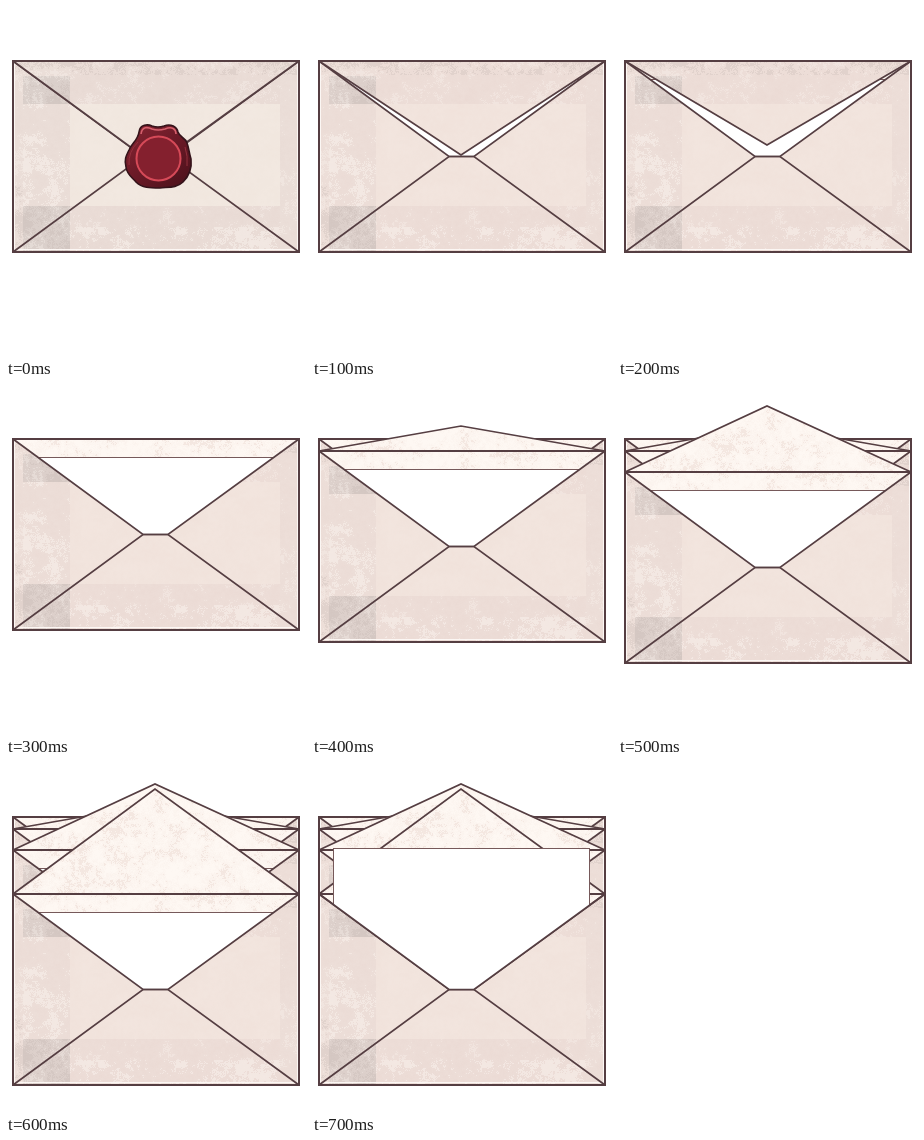
These frames come from a looping animation (300 by 350 pixels, 0.8 s). An HTML page with a canvas:

```html
<!DOCTYPE html>
<html lang="en">
<head>
<meta charset="utf-8">
<title>Opening envelope</title>
<style>
  html, body { margin: 0; width: 100%; height: 100%; overflow: hidden; background: #fff; }
  canvas { display: block; width: 300px; height: 350px; }
</style>
</head>
<body>
<canvas id="stage" width="300" height="350"></canvas>
<script>
const W = 300, H = 350, L = 7, R = 293, TOP = 55, TALL = 191;
const STEP = 100;
const INK = '#553e42';

// Each pose: envelope drop, height of the flap tip, and what else is shown.
const poses = [
  { drop: 0, tip: 159, seal: true },
  { drop: 0, tip: 149 },
  { drop: 0, tip: 139 },
  { drop: 0, tip: 55 },
  { drop: 12, tip: 42 },
  { drop: 33, tip: 22 },
  { drop: 77, tip: 27 },
  { drop: 77, letter: 86 }
];

function makeCanvas(w, h) {
  const c = document.createElement('canvas');
  c.width = w;
  c.height = h;
  return c;
}

function hash(x, y) {
  let n = Math.imul(x, 374761393) + Math.imul(y, 668265263) | 0;
  n = Math.imul(n ^ (n >>> 13), 1274126177);
  return ((n ^ (n >>> 16)) >>> 0) / 4294967296;
}

function noise(x, y) {
  const i = Math.floor(x), j = Math.floor(y);
  const ease = t => t * t * (3 - 2 * t);
  const u = ease(x - i), v = ease(y - j);
  const a = hash(i, j), b = hash(i + 1, j), c = hash(i, j + 1), d = hash(i + 1, j + 1);
  return a + (b - a) * u + (c - a) * v + (a - b - c + d) * u * v;
}

const grain = (x, y) =>
  noise(x / 16, y / 13) * .4 + noise(x / 3.5 + 40, y / 3.5) * .35 + hash(x, y + 500) * .25;

const mix = (a, b, k) => a.map((v, i) => v + (b[i] - v) * k);

function texture(w, h, shade) {
  const c = makeCanvas(w, h), g = c.getContext('2d');
  const img = g.createImageData(w, h);
  for (let y = 0; y < h; y++) {
    for (let x = 0; x < w; x++) {
      const p = shade(x, y), k = (y * w + x) * 4;
      img.data.set([p[0], p[1], p[2], 255], k);
    }
  }
  g.putImageData(img, 0, 0);
  return c;
}

const white = [252, 246, 241], grey = [200, 187, 182];

function paper(tones) {
  return texture(W, TALL, (x, y) => {
    if (x === 8 || x === 291 || y === TALL - 3) return [252, 247, 244];
    const strip = x >= 17 && x < 64;
    const middle = x >= 64 && x < 274 && y >= 43 && y < 145;
    const patch = strip && (y >= 15 && y < 43 || y >= 145);
    const n = grain(x, y);
    let p = middle ? tones.middle : patch ? tones.patch
      : strip || x < 17 || x >= 274 ? tones.strip : tones.band;
    p = mix(p, white, (n - .5) * .25 + .03);
    const worn = strip && y >= 43 && y < 145 || x >= 64 && x < 274 && y > 165;
    if (worn && n > .56) p = mix(p, white, .4);
    if (!middle && !worn && n > .66) p = mix(p, white, .25);
    const smudge = y < 14 || patch || x < 17 && y > 120;
    if (smudge && n < .42) p = mix(p, grey, .3);
    return p;
  });
}

const agedPaper = paper({
  middle: [241, 231, 223], band: [233, 219, 213], strip: [234, 221, 215], patch: [217, 206, 201]
});
const pinkPaper = paper({
  middle: [241, 227, 220], band: [236, 220, 214], strip: [236, 221, 215], patch: [219, 206, 201]
});
const lining = texture(W, 130, (x, y) => {
  const n = grain(x + 70, y + 90);
  const p = mix([248, 238, 232], [254, 248, 243], Math.max(0, Math.min(1, n * 1.8 - .2)));
  return n < .34 ? mix(p, [234, 215, 207], .35) : p;
});

const stage = document.getElementById('stage').getContext('2d');
const sheet = makeCanvas(W, H), ctx = sheet.getContext('2d');

function trace(points, close) {
  ctx.beginPath();
  points.forEach(([x, y]) => ctx.lineTo(x, y));
  if (close) ctx.closePath();
}

function line(points) {
  trace(points);
  ctx.lineWidth = 1.7;
  ctx.strokeStyle = INK;
  ctx.stroke();
}

function clipped(points, draw) {
  ctx.save();
  trace(points, true);
  ctx.clip();
  draw();
  ctx.restore();
}

const notch = y => [[L, y], [137, y + 95.5], [162, y + 95.5], [R, y]];

function drawLetter(y) {
  ctx.fillStyle = '#fff';
  ctx.fillRect(22, y, 255, 190);
  ctx.strokeStyle = '#76595a';
  ctx.lineWidth = 1;
  ctx.strokeRect(21.5, y + .5, 256, 190);
}

function drawBody(y, skin) {
  ctx.drawImage(skin, L, 0, R - L, TALL, L, y, R - L, TALL);
}

function drawFrame(y) {
  ctx.strokeStyle = INK;
  ctx.lineWidth = 2;
  ctx.strokeRect(L, y, R - L, TALL);
}

function drawSeal() {
  const shape = (d, width, color) => {
    const path = new Path2D(d);
    ctx.lineWidth = width;
    ctx.strokeStyle = color;
    ctx.stroke(path);
  };
  const disc = (radius, fill, rim) => {
    ctx.beginPath();
    ctx.arc(152.5, 152.5, radius, 0, Math.PI * 2);
    ctx.fillStyle = fill;
    ctx.fill();
    ctx.lineWidth = 2;
    ctx.strokeStyle = rim;
    ctx.stroke();
  };
  const blob = 'M133 126C134 118 142 118 146 120Q152 122 158 120' +
    'C165 117 171 121 172 126C174 132 179 131 181 137C183 142 183 147 185 153' +
    'C186 162 183 170 177 176C171 182 162 181 154 182C144 182 136 182 130 176' +
    'C126 171 121 169 120 161C118 154 120 150 123 144C126 137 132 134 133 126Z';
  const wax = ctx.createLinearGradient(128, 120, 180, 182);
  wax.addColorStop(0, '#842431');
  wax.addColorStop(.45, '#6c1a27');
  wax.addColorStop(1, '#4c111b');
  ctx.lineJoin = 'round';
  ctx.fillStyle = wax;
  ctx.fill(new Path2D(blob));
  shape(blob, 1.6, '#34131a');
  shape('M135 128C136 120 142 121 146 123Q152 125 159 123C166 120 170 123 170 128', 1.6, '#d5606d');
  shape('M132 136Q122 146 123 159M179 141Q182 150 181 160', 1, '#93303d');
  disc(22, '#84202e', '#d64a58');
  ctx.lineJoin = 'miter';
}

function drawOpen(y, tip, skin) {
  const bottom = y + TALL, flap = [[L, y], [149, tip], [R, y]];
  drawBody(y, skin);
  clipped(notch(y), () => {
    ctx.drawImage(lining, 0, y);
    drawLetter(y + 18);
  });
  line([[L, bottom], ...notch(y).slice(1, 3), [R, bottom]]);
  line(notch(y));
  clipped(flap, () => {
    if (tip > y) drawBody(y, skin);
    else ctx.drawImage(lining, 0, tip);
  });
  line(flap);
  drawFrame(y);
}

function drawPose({ drop, tip, seal, letter }) {
  const y = TOP + drop;
  if (letter) {
    clipped([[L, 0], ...notch(y), [R, 0]], () => drawLetter(letter));
    line(notch(y));
  } else {
    drawOpen(y, tip, seal ? agedPaper : pinkPaper);
  }
  if (seal) drawSeal();
}

// Earlier poses stay visible behind the later ones.
ctx.fillStyle = '#fff';
ctx.fillRect(0, 0, W, H);
const cels = poses.map(pose => {
  drawPose(pose);
  const cel = makeCanvas(W, H);
  cel.getContext('2d').drawImage(sheet, 0, 0);
  return cel;
});

const start = performance.now();
function play(now) {
  const t = Math.max(0, now - start);
  stage.drawImage(cels[Math.floor(t / STEP) % cels.length], 0, 0);
  requestAnimationFrame(play);
}
play(start);
</script>
</body>
</html>
```
